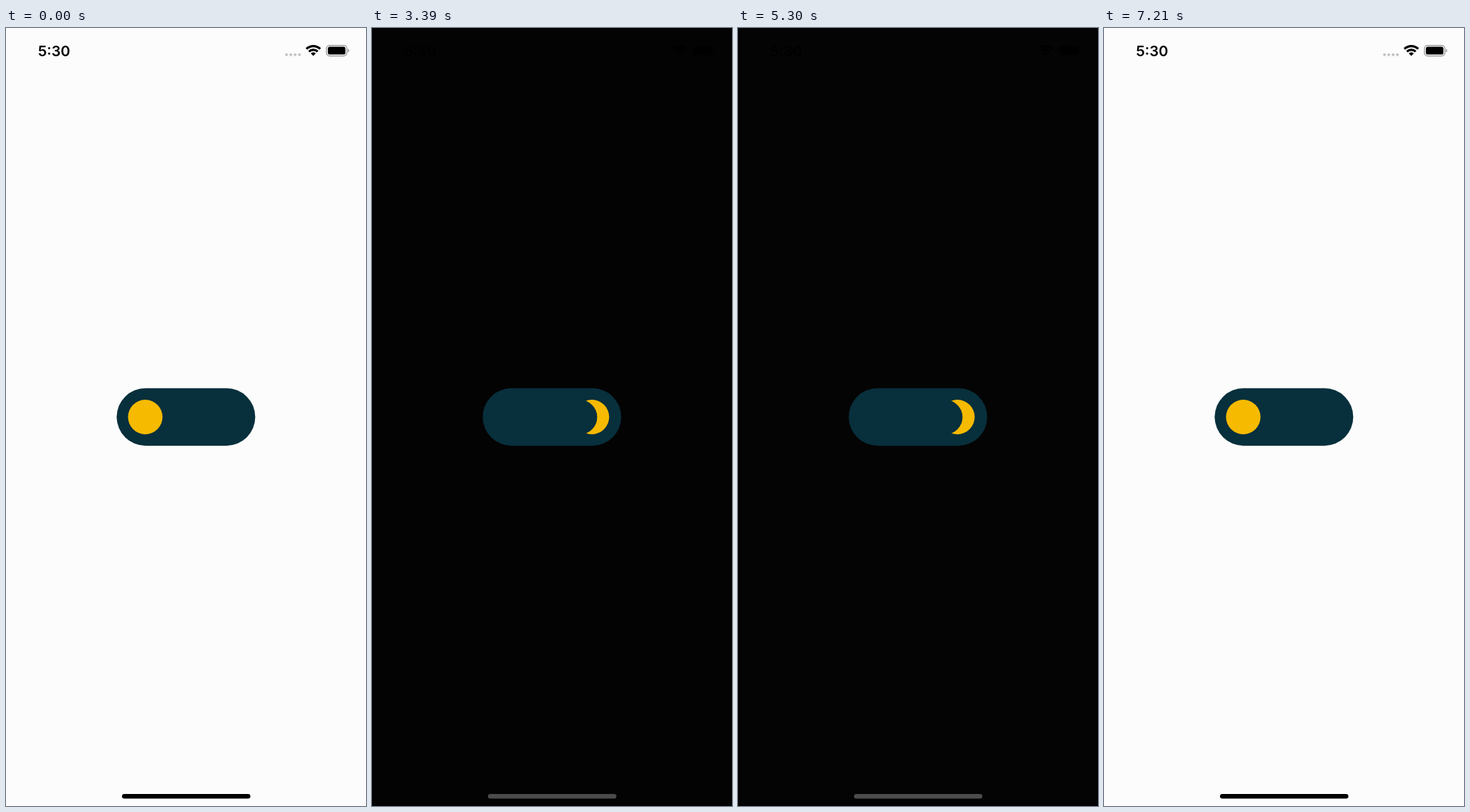
Write an HTML page without scripts that moves like this. It is 509x1101 px and loops after 7.24 s.

```html
<!DOCTYPE html>
<html lang="en">
<head>
<meta charset="utf-8">
<title>Dark mode switch</title>
<style>
  /* 0 = light, 1 = dark */
  @property --dark {
    syntax: "<number>";
    inherits: true;
    initial-value: 0;
  }

  html, body {
    margin: 0;
    width: 100%;
    height: 100%;
    overflow: hidden;
  }

  .screen {
    --paper: calc(252 * (1 - var(--dark)));
    --bar: calc(76 * var(--dark));
    display: block;
    width: 509px;
    height: 1101px;
    background: rgb(var(--paper) var(--paper) var(--paper));
    animation: toggle 7240ms linear infinite;
  }

  .clock { font: 600 20.5px Inter, sans-serif; }
  .faint { opacity: .21; }
  .band { fill: none; stroke: #000; stroke-width: 3.2; }
  .case { fill: none; stroke: #000; stroke-width: 1.3; opacity: .42; }
  .home { fill: rgb(var(--bar) var(--bar) var(--bar)); }
  .pill, .shade { fill: #082f3c; }
  .knob { fill: #f6ba00; transform: translateX(calc(115.2px * var(--dark))); }
  .shade { transform: translateX(calc(163.7px * var(--dark))); }

  /* Each toggle is a 500 ms quadratic ease-in-out, split at its midpoint */
  @keyframes toggle {
    0%, 53.246%, 73.84%, 99.24%, 100% { animation-timing-function: linear; }
    0%, 53.246%, 99.24%, 100% { --dark: 0; }
    23.895%, 73.84% { --dark: 1; }
    16.989%, 66.934% {
      --dark: 0;
      animation-timing-function: cubic-bezier(.3333, 0, .6667, .3333);
    }
    46.34%, 92.334% {
      --dark: 1;
      animation-timing-function: cubic-bezier(.3333, 0, .6667, .3333);
    }
    20.442%, 49.793%, 70.387%, 95.787% {
      --dark: .5;
      animation-timing-function: cubic-bezier(.3333, .6667, .6667, 1);
    }
  }
</style>
</head>
<body>
<svg class="screen" viewBox="0 0 509 1101">
  <defs>
    <clipPath id="track">
      <rect x="156.5" y="509.7" width="195.9" height="81.5" rx="40.75"/>
    </clipPath>
  </defs>

  <text class="clock" x="45.2" y="40">5:30</text>

  <g class="faint">
    <circle cx="396.6" cy="37.8" r="2.1"/>
    <circle cx="402.7" cy="37.8" r="2.1"/>
    <circle cx="408.8" cy="37.8" r="2.1"/>
    <circle cx="414.9" cy="37.8" r="2.1"/>
  </g>

  <g>
    <path class="band" d="M424.74 29.74a13.8 13.8 0 0 1 19.52 0"/>
    <path class="band" d="M428.35 33.35a8.7 8.7 0 0 1 12.3 0"/>
    <path d="M434.5 39.5l-3.5-3.5a5 5 0 0 1 7 0z"/>
  </g>

  <g>
    <rect class="case" x="453.1" y="24.6" width="28.8" height="15" rx="4.4"/>
    <rect x="455.1" y="26.6" width="24.8" height="11" rx="2.6"/>
    <path d="M483.5 29.6q1.7.8 1.7 2.5t-1.7 2.5z" opacity=".45"/>
  </g>

  <rect class="pill" x="156.5" y="509.7" width="195.9" height="81.5" rx="40.75"/>
  <g clip-path="url(#track)">
    <circle class="knob" cx="196.9" cy="550.5" r="24.4"/>
    <circle class="shade" cx="131.9" cy="550.7" r="24.5"/>
  </g>

  <rect class="home" x="164" y="1084" width="181.5" height="6.6" rx="3.3"/>
</svg>
</body>
</html>
```
